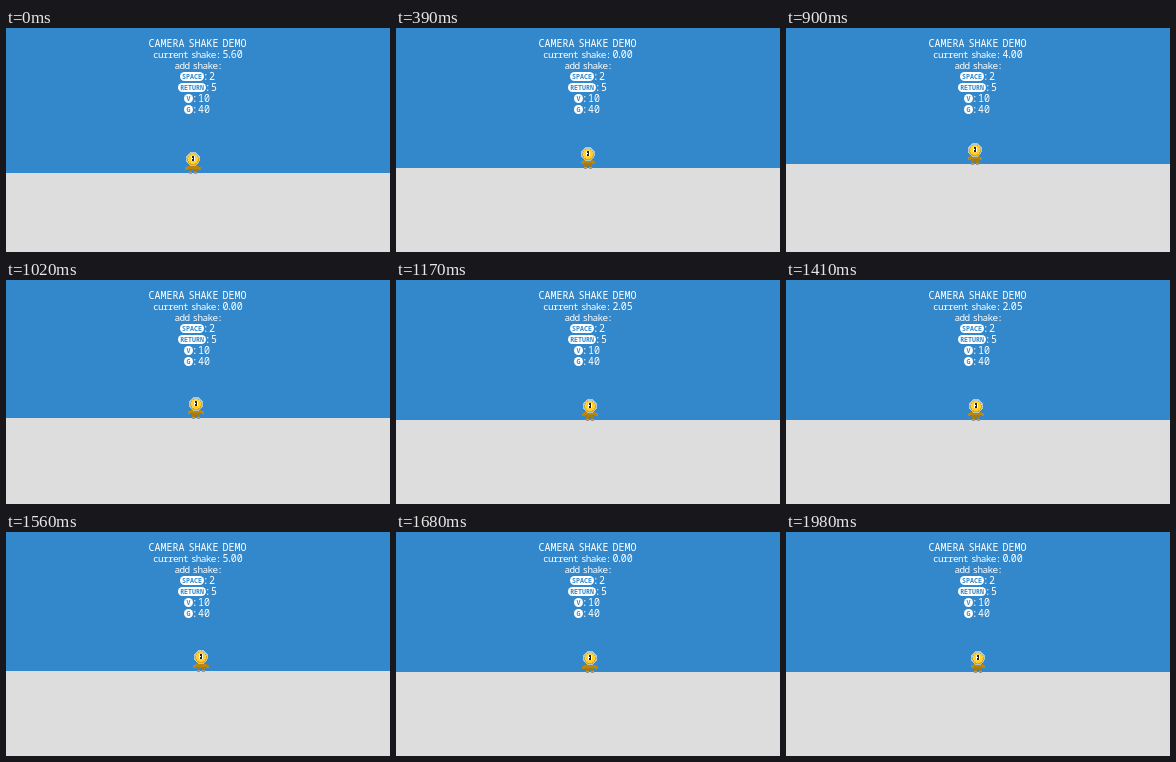
An HTML page that plays this animation: 384 by 224 pixels, repeating every 2190 ms.

```html
<!DOCTYPE html>
<html lang="en">
<head>
<meta charset="utf-8">
<title>Camera shake demo</title>
<style>
  html, body { margin: 0; width: 100%; height: 100%; overflow: hidden; background: #38c; }
  svg { display: block; width: 384px; height: 224px; }
  text { font-family: "Noto Sans Mono", "DejaVu Sans Mono", monospace; font-size: 10px; fill: #fff; word-spacing: -2px; }
  .low { font-size: 9.4px; letter-spacing: -.64px; }
  .key { font-size: 6.6px; font-weight: 700; fill: #38c; text-anchor: middle; }
  #hero { shape-rendering: crispEdges; }
</style>
</head>
<body>
<svg viewBox="0 0 384 224">
  <rect width="384" height="224" fill="#38c"/>
  <rect id="ground" y="140" width="384" height="120" fill="#ddd"/>
  <g id="hero">
    <path fill="#999" d="M-4-1h3v2h-3zM1-1h3v2h-3z"/>
    <path fill="#a87a10" d="M-4-8h8v7h-3v-2h-2v2h-3z"/>
    <path id="arms" fill="#b9860f"/>
    <circle cy="-14" r="7" fill="#b4c8cc"/>
    <circle cy="-13.5" r="5.8" fill="#dfa51a"/>
    <circle cy="-14" r="5" fill="#ffd12a"/>
    <path fill="#fff" d="M-2-17h4v5h-4z"/>
    <path fill="#222" d="M-1-17h2v5h-2z"/>
    <path fill="#fff" d="M-1-15h1v1h-1z"/>
  </g>

  <text x="142.5" y="19">CAMERA SHAKE DEMO</text>
  <text class="low" x="147" y="30">current shake:</text>
  <g id="value">
    <text x="216.5" y="30"></text>
    <text x="220.6" y="30">.</text>
    <text x="224.8" y="30"></text>
  </g>
  <text class="low" x="168.5" y="41">add shake:</text>
  <g id="keys"></g>
</svg>
<script>
const LOOP = 2190, STEP = 30, DECAY = 0.64, POSE = 530;
const $ = id => document.getElementById(id);

// start ms, shake, optional first offset x y
const presses = [
  [0, 5.6, -5, 5],
  [210, 1.28, 1, -1],
  [900, 4, -3, -4],
  [1110, 5],
  [1260, 2.99, 8, 8],
  [1350, 5],
  [1560, 5, 3, -1],
  [1740, 5, 1, -1]
];

const keys = { SPACE: 2, RETURN: 5, V: 10, G: 40 };

$("keys").innerHTML = Object.entries(keys).map(([label, amount], i) => {
  const y = 52 + 11 * i;
  const w = label.length > 1 ? 4 + 4 * label.length : 9;
  const cx = label.length > 1 ? 186 : 182.5;
  const right = cx + w / 2;
  return `<rect x="${cx - w / 2}" y="${y - 8}" width="${w}" height="9" rx="4.5" fill="#fff"/>
    <text class="key" x="${cx}" y="${y - 1.1}">${label}</text>
    <text x="${right - 1.2}" y="${y}">:</text>
    <text x="${right + 5}" y="${y}">${amount}</text>`;
}).join("");

const random = seed => {
  const s = Math.sin(seed * 12.9898) * 43758.5453;
  return s - Math.floor(s);
};

function jitter(seed, size) {
  const angle = random(seed) * 2 * Math.PI;
  return [Math.cos(angle), Math.sin(angle)].map(v => Math.round(v * size));
}

function camera(t) {
  const [start, power, ...first] = presses.filter(p => p[0] <= t).pop();
  const n = Math.floor((t - start) / STEP);
  const shake = power * DECAY ** n;
  const offset = first.length ? first : jitter(start, power);
  if (shake < 1) return [0, ...offset.map(v => Math.trunc(v * 0.67))];
  return [shake, ...(n ? jitter(start + n, shake) : offset)];
}

function armPath(pose) {
  const reach = 8 - pose % 2;
  const drop = pose === 0 ? -6 : -7;
  return `M${-reach} ${drop}h2v-1h${2 * reach - 4}v1h2v3h-3v-1h${6 - 2 * reach}v1h-3z`;
}

const [whole, , decimals] = $("value").children;

function draw(now) {
  const t = Math.floor((now % LOOP) / STEP) * STEP;
  const [shake, dx, dy] = camera(t);
  const pose = Math.floor((t + 140) / POSE) % 3;
  $("ground").setAttribute("y", 140 + dy);
  $("hero").setAttribute("transform", `translate(${192 + dx} ${140 + dy})`);
  $("arms").setAttribute("d", armPath(pose));
  [whole.textContent, decimals.textContent] = shake.toFixed(2).split(".");
}

const begin = performance.now();
function tick() {
  draw(performance.now() - begin);
  requestAnimationFrame(tick);
}
tick();
</script>
</body>
</html>
```
